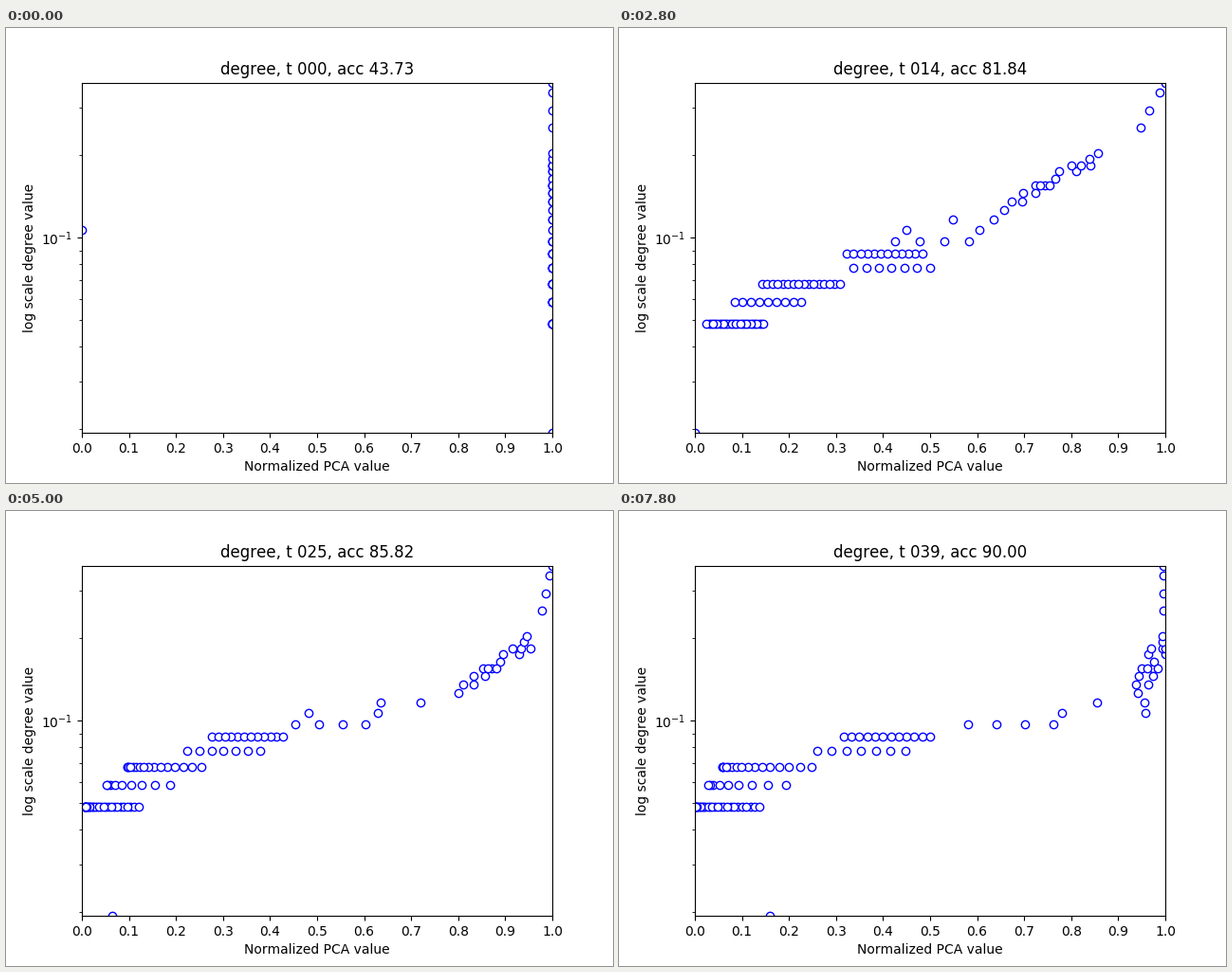
These frames come from a looping animation (640 px wide and 480 px high, 8000 ms). A matplotlib script:

```python
import numpy as np
import matplotlib.pyplot as plt
from matplotlib.animation import FuncAnimation
from matplotlib.ticker import NullFormatter

FRAMES, STEP = 40, 200
FLIP = 8       # the component changes sign at this step
NODES = 103    # degrees are normalised by this

# How many nodes share each degree.
COUNTS = {2: 1, 5: 28, 6: 9, 7: 16, 8: 7, 9: 12, 10: 4, 11: 2, 12: 2, 13: 1,
          14: 2, 15: 2, 16: 4, 17: 1, 18: 2, 19: 3}
COUNTS.update(dict.fromkeys([20, 21, 26, 30, 35, 38], 1))

# Left edge of the cloud as a curve over degree, at a few key steps.
KNOTS = [2, 5, 7, 8, 9, 10, 11, 13, 19, 26, 38]
EDGES = {
    9: [0, .165, .355, .48, .50, .575, .597, .738, .845, .955, 1],
    14: [0, .025, .143, .337, .323, .425, .45, .647, .80, .948, 1],
    18: [0, 0, .09, .246, .204, .333, .357, .64, .80, .948, 1],
    25: [.065, .006, .097, .224, .276, .454, .482, .79, .915, .978, 1],
    34: [.153, 0, .065, .25, .333, .542, .683, .91, .968, 1, 1],
    39: [.159, 0, .058, .26, .316, .58, .78, .93, .97, .996, .995],
}
STEPS = list(EDGES)

degrees = np.repeat(list(COUNTS), list(COUNTS.values()))
rank = np.concatenate([np.linspace(0, 1, n) if n > 1 else [.5]
                       for n in COUNTS.values()])

# A shuffled drawing order mixes which circles overlap which.
order = np.random.default_rng(4).permutation(len(degrees))
degrees, rank = degrees[order], rank[order]
start = np.flatnonzero(degrees == 11)[0]
width = np.interp(degrees, [2, 5, 7, 11, 13, 19, 26],
                  [0, .12, .165, .155, .02, .04, 0])


def pose(step):
    """Spread each degree's nodes rightwards from the edge curve."""
    edge = np.interp(degrees, KNOTS, EDGES[step])
    scale = np.interp(step, [9, 14, 18, 25, 39], [.55, 1, 1.2, .95, 1.15])
    skew = np.interp(step, [14, 25], [1, 2])  # low degrees bunch up later
    along = np.where(degrees < 8, rank ** skew, rank)
    return np.clip(edge + scale * width * along, 0, 1)


poses = np.array([pose(s) for s in STEPS])


def positions(t):
    if t == 0:
        x = np.zeros(len(degrees))
        x[start] = 1
    elif t < STEPS[0]:
        x = poses[0] ** (1 + 0.25 * (STEPS[0] - t))
    else:
        x = np.array([np.interp(t, STEPS, path) for path in poses.T])
    return 1 - x if t < FLIP else x


def accuracy(t):
    return np.interp(t, [0, 1, 3, 6, 9, 14, 18, 25, 34, 39],
                     [43.73, 66.2, 81.35, 89.9, 91.74, 81.84,
                      82.26, 85.82, 89.01, 90.00])


plt.rcParams["text.kerning_factor"] = 6
fig, ax = plt.subplots(figsize=(6.4, 4.8), dpi=100)
dots, = ax.plot(positions(0), degrees / NODES, "bo", markerfacecolor="w")
ax.set_yscale("log")
ax.yaxis.set_minor_formatter(NullFormatter())
ax.set_xlim(0, 1)
ax.set_ylim(2 / NODES, 38 / NODES)
ax.set_xticks(np.arange(11) / 10)
ax.set_xlabel("Normalized PCA value")
ax.set_ylabel("log scale degree value")
title = ax.set_title("")


def draw(t):
    dots.set_xdata(positions(t))
    title.set_text(f"degree, t {t:03d}, acc {accuracy(t):.2f}")
    return dots, title


anim = FuncAnimation(fig, draw, frames=FRAMES, interval=STEP, repeat=True)
plt.show()
```
